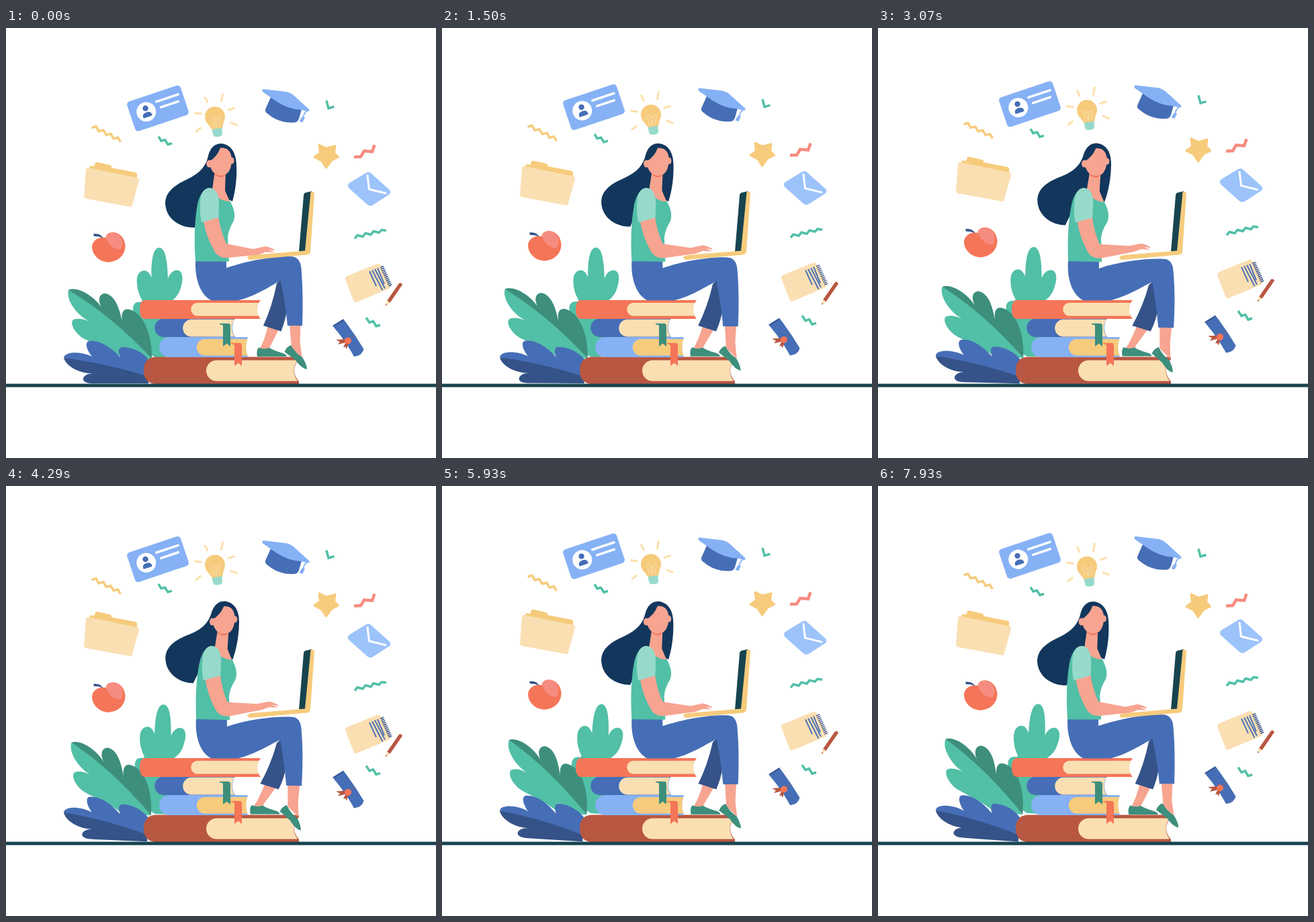
These frames come from a looping animation (640 by 640 pixels, 8 s). An HTML page:

```html
<!DOCTYPE html>
<html lang="en">
<head>
<meta charset="utf-8">
<title>Learning online</title>
<style>
  html, body { margin: 0; width: 100%; height: 100%; overflow: hidden; background: #fff; }
  svg { display: block; width: 100vw; height: 100vh; }
  .line { fill: none; }
  .round { stroke-linecap: round; stroke-linejoin: round; }
  .navy { fill: #13375c; }
  .blue { fill: #466eb6; }
  .deep { fill: #355389; }
  .sky { fill: #86b1f5; }
  .green { fill: #52bfa7; }
  .fern { fill: #3d8f7c; }
  .skin { fill: #f7a491; }
  .coral { fill: #f57558; }
  .gold { fill: #f6cb7c; }
  .cream { fill: #fadfb3; }
  .brick { fill: #b85742; }
  .teal { fill: #17444f; }
</style>
</head>
<body>
<svg viewBox="0 0 640 640">
  <!-- floating things: data-rise is the time to the top, in ms -->
  <g data-rise="7100">
    <g transform="translate(226 119.5) rotate(-18.5)">
      <rect class="sky" x="-42" y="-23.2" width="84" height="46.400" rx="5"/>
      <circle cx="-18" cy="-.5" r="14.500" fill="#fff"/>
      <circle class="blue" cx="-17.500" cy="-5.800" r="4.200"/>
      <path class="blue" d="M-25 6.500C-25 1-21 .2-18 .2S-11 1-11 6.500Q-11 7.500-13 7.500H-23Q-25 7.500-25 6.500Z"/>
      <path class="line round" stroke="#fff" stroke-width="3.500" d="M1-10H35M5 0H32"/>
    </g>
  </g>
  <g data-rise="6100">
    <path class="gold" d="M124 210L125 205L131 206L133 201Q134 199 137 200L155 204Q158 205 157 208L193 215Q196 216 195 221L194 230L124 215Z"/>
    <path class="cream" d="M123 208L196 223Q199 224 198 227L188 263Q187 267 184 266L119 254Q116 253 116 250L119 211Q120 207 123 208Z"/>
  </g>
  <g data-rise="6500">
    <path class="coral" d="M149 312C135 310 128 318 128 326C129 340 141 349 154 348.500C168 347 178 337 177.500 323C176 310 167 304 159 304C153 304 148 308 149 312Z"/>
    <path fill="#f68c7f" d="M149 311C150 305 160 303 166 306C174 311 176 322 171 329C163 332 150 321 149 311Z"/>
    <path class="deep" d="M130 306.500Q141 305 144.500 313Q139 309.500 131 310Z"/>
  </g>
  <g data-rise="5300">
    <circle class="gold" cx="311" cy="132" r="15"/>
    <path class="gold" d="M299 141L307 151.500L322 149.500L324 139Z"/>
    <path fill="#97dacb" d="M306.500 151L321.500 148.500L322 158Q321 161 318 161.500L313 162Q309 162 308 158Z"/>
    <path class="line" stroke="#fadfb3" d="M309.500 149L306 137A2.600 2.600 0 1 1 309.500 134L312 136L315 134A2.600 2.600 0 1 1 318 137L318 147M309.500 134L313 148L315 134"/>
    <path class="line round" stroke="#fbe0ac" stroke-width="3" d="M296.500 103.500L300 110.500M322.500 98.500L320.500 109M331 122L339.500 119.500M335 141L343.500 144.500M283 154L289.500 149M281.500 126.500L290.500 127.500"/>
  </g>
  <g data-rise="7500">
    <path class="blue" d="M394 103L386 121Q385 125 390 128C400 137 415 142 430 140.500Q434 140 436 135L440 121L410 108Z"/>
    <path class="sky" d="M384 91L418 95Q425 97 429 101L451 121Q453 124.500 449 124L440 122Q420 121 402 109L382 95Q380 91 384 91Z"/>
    <path class="line" stroke="#86b1f5" stroke-width="1.800" d="M448.500 123Q443.500 126 442.500 133"/>
    <path class="sky" d="M440.500 132L445 133L441.500 140.500L436.500 139Z"/>
  </g>
  <path data-rise="5500" fill="#f6cb7c" stroke="#f6cb7c" stroke-width="3" stroke-linejoin="round" d="M466 174L477 179L490 175.500L488.500 186L494.500 192L484.500 197L476.500 208L470 198L459 192L467.500 186Z"/>
  <g data-rise="7800">
    <path fill="#9cc3fa" d="M512 230L536 215.500Q540 213.500 543 216L571 241Q574 245 570 248L546 263.500Q542 266 538 263L510 238Q507 233 512 230Z"/>
    <path class="line round" stroke="#fff" stroke-width="3" d="M538 219.500L540.500 240L565 246"/>
  </g>
  <g data-rise="7300">
    <path class="cream" d="M508 369L552 351Q556 350 558 354L572 382Q573 386 570 388L522 408Q518 409 517 405L505 374Q505 370 508 369Z"/>
    <path id="notes" class="line" stroke="#466eb6" stroke-width="1.900"/>
    <path id="coil" class="line" stroke="#355389" stroke-width="1.500"/>
  </g>
  <g data-rise="7300">
    <path class="brick" d="M585 380Q588 378.500 590 382L571.500 409L567 406Z"/>
    <path class="cream" d="M567 405.500L571.800 408.800L565 413.500Z"/>
    <path class="brick" d="M565.500 410.500L567.500 412L565 413.500Z"/>
  </g>
  <g data-rise="7700">
    <path class="blue" d="M486 443L502 433Q519 455 532.500 478Q530 488 518 489Q505 465 486 443Z"/>
    <path class="line" stroke="#355389" stroke-width="1.500" d="M487.500 443.500L502 434.500"/>
    <path class="brick" d="M491 464L505 463L506 468L494 471L497 467ZM506 467L502 475L505 474.500L507 478L509.500 469Z"/>
    <path class="line" stroke="#b85742" d="M513 462L518 457.500"/>
    <circle class="coral" cx="509" cy="465.500" r="5"/>
  </g>
  <g class="line" stroke="#52bfa7" stroke-width="3.500">
    <path data-rise="8000" stroke="#f6cb7c" d="M127.500 148.500L134 146.500L138 153.500L145 152L149 159L156 157.500L160 164.500L166.500 163L170.500 169.500"/>
    <path data-rise="4800" d="M227 161.500L231 168L236.500 166.500L241 173.500L247 171.500"/>
    <path data-rise="6300" d="M477 108L480 119.500L488.500 117"/>
    <path data-rise="5800" stroke="#f68c7f" stroke-width="4.500" d="M518 192L528 191.500L533 183L545 184L548.500 174"/>
    <path data-rise="8100" d="M519 313.500L523 308.500L531 310.500L535 305.500L543 307.500L547 302.500L555 304.500L559 300.500L566 301.500"/>
    <path data-rise="5300" d="M536 431L541 438.500L546.500 436.500L551 444L557 442"/>
  </g>

  <g id="bush">
    <path class="green" d="M222 490C200 480 190 440 189 418C189 410 194 407 201 408L203 406C196 394 194 382 195 372C197 361 206 358.500 211 363C214 366 215 368 216.500 371C216 350 218 327 228 327C238 327 240.500 350 241 373C244 364 251 359 257 361C264 364 263.500 375 260.500 385C258 396 252 402 247 406L237 490Z"/>
  </g>
  <g id="fern">
    <path class="green" d="M93 390C90 400 97 414 108 425C115 432 122 436 129 439C116 432 104 431 99 435C96 441 101 451 112 460C126 469 150 474 175 492L217 492L150 420Z"/>
    <path class="fern" d="M93 390C105 384 132 398 145 420C136 408 137 396 147 395C162 397 169 417 173 437C171 424 174 418.500 181 418.500C203 421 218 455 217 492Q157 428 93 390Z"/>
  </g>
  <g id="frond">
    <path class="deep" d="M86 491C90 505 112 515 130 514C120 514 114 519 115 524C118 529 125 529 135 529H212V510L150 496Z"/>
    <path class="blue" d="M86 491C87 481 112 481 128 489C119 478 117 467 124 466C141 464 159 478 170 490C166 479 168 475 174 475C191 475 205 485 212 493V519Q150 499 86 491Z"/>
  </g>

  <!-- books -->
  <path class="brick" d="M222 489.500H436V493Q422 510 436 526V530H222Q205 528 205 510Q205 491 222 489.500Z"/>
  <path class="cream" d="M313.500 494.500H434Q423 510 434 525.500H313.500A15.500 15.500 0 0 1 313.500 494.500Z"/>
  <path class="sky" d="M243 460H360Q354 475 360 490H243A15 15 0 0 1 243 460Z"/>
  <path class="gold" d="M296 463H359.500Q355 475 359.500 487.500H296A12.250 12.250 0 0 1 296 463Z"/>
  <path class="blue" d="M235 432.500H341Q332 446 341 460H235A13.750 13.750 0 0 1 235 432.500Z"/>
  <path class="cream" d="M275 433.800H340Q332 446 340 459.500H275A12.900 12.900 0 0 1 275 433.800Z"/>
  <path class="coral" d="M206 405H379Q368 419 379 433H206Q199 432 199 419T206 405Z"/>
  <path class="cream" d="M285 409H376.500Q370.500 419 376.500 428.500H285A9.750 9.750 0 0 1 285 409Z"/>
  <path class="fern" d="M318 439.800H331Q334 440 334 444V474L328.500 469.500L323 474V443Q322 441.200 318 441.200Z"/>
  <path class="coral" d="M335 468.800H348Q351 469 351 473V503L345.700 498.500L340 503V473Q340 470.200 335 470.200Z"/>
  <rect class="teal" y="529.500" width="640" height="5"/>

  <!-- reader -->
  <path id="calf" class="skin"/>
  <path id="backShoe" class="fern" d="M376 475.500Q372 480 374 489L417.500 489Q418 486 412 484Q398 480 392 476Q385 479 376 475.500Z"/>
  <path id="shin" class="skin"/>
  <path id="frontShoe" class="fern" d="M424 472Q418 474 414.500 482L431 494.500Q440 507 448 508Q447.500 500 441 490Q431 484 424 472Z"/>
  <path id="backLeg" class="deep"/>
  <path id="frontLeg" class="blue"/>
  <path class="teal" d="M443 249Q443 246 446 245L455 243L447 332.500L436 333Z"/>
  <path class="gold" d="M453.500 244Q459 242 459 247L453 333Q452 337 448 337.500L364 345Q360 345 359 341Q362 338.500 367 338L445 331.500Z"/>
  <path id="hair" class="navy" d="M320 172C335 173 343 186 343 205C344 225 341 245 337 258Q330 256 326 250L310 250Q292 255 288 280L281 297C260 298 238 285 237 261C237 242 255 232 270 225C289 216 298 205 301 190C304 178 311 172 320 172Z"/>
  <g id="torso">
    <path class="green" d="M307 240Q312 256 333 257C339 268 342 277 339 287Q331 300 330 312L332 347.500L282 347.500C280 320 280 290 285 262Q290 240 303 238Z"/>
    <path class="skin" d="M311 212L307 240Q315 258 333 258L326 242L327 212Z"/>
    <path class="coral" d="M310 213L310 217Q319 226 326.500 219L328 213Z"/>
    <ellipse class="skin" cx="302.500" cy="202" rx="4.200" ry="5.500"/>
    <ellipse class="skin" cx="336.500" cy="197.500" rx="3" ry="5"/>
    <path class="skin" d="M319 178.500C331 177 336 186 336 197C335 212 330 220 319 219.500C311 219 306 213 304 206L303 198Q314 192 319 178.500Z"/>
    <path id="arm" class="skin"/>
    <path fill="#97dacb" d="M289 262C289 244 296 238 303 238C313 239 317 248 317 262L316.500 282L291 289.500Q288 275 289 262Z"/>
  </g>
</svg>
<script>
  const LOOP = 8000, HEIGHT = 16, FALL = 8300, SWAY = 7500, LEAN = 3650;
  const el = id => document.getElementById(id);
  const set = (id, name, value) => el(id).setAttribute(name, value);
  const draw = (id, d) => set(id, 'd', d);
  const turn = (id, angle, x, y) => set(id, 'transform', `rotate(${angle} ${x} ${y})`);
  const wave = (t, half) => (1 - Math.cos(Math.PI * t / half)) / 2;
  const floats = [...document.querySelectorAll('[data-rise]')];

  const repeat = (n, f) => Array.from({ length: n }, (_, i) => f(i)).join('');
  draw('notes', repeat(4, i => `M${541 + i * 4} ${362 - i * 1.6}l${[10, 15.5, 15, 10][i]} ${[22, 30, 29, 24][i]}`));
  draw('coil', repeat(12, i => `M${557 + i * 1.12} ${356.5 + i * 2.5}l5 -2`));

  // quick rise, slower fall
  const lift = (t, rise) => HEIGHT * (t < rise ? wave(t, rise) : 1 - wave(t - rise, FALL));

  function reader(p) {
    turn('torso', 1.5 * p, 300, 395);
    turn('hair', 4.2 * p, 330, 262);

    const hx = 4 * p, hy = -7 * p;
    draw('arm', `M294 288L316 281Q320 305 328 321L${368 + hx} ${329 + hy}L${386 + hx} ${325 + hy}
      Q${397 + hx} ${327 + hy} ${401 + hx} ${331.5 + hy}L${390 + hx} ${330 + hy}L${400 + hx} ${334 + hy}
      L${386 + hx} ${333.5 + hy}L${376 + hx} ${337.5 + hy}L330 342Q315 343 309 330Q298 310 294 288Z`);

    draw('frontLeg', `M${282 + p} 347H${328 + p}V${357 + p}C${360 + p} ${346 + p} 400 ${339 + 4 * p} 425 ${340 + 4 * p}
      Q438 ${341 + 3 * p} 439.500 ${358 + 3 * p}C442 390 442 415 ${441 - p} ${443 + 3.5 * p}L${419 - 2 * p} ${443 + 3 * p}
      Q${416 - 2 * p} 410 ${409 - p} ${376 + 2 * p}C395 ${383 + p} 370 400 345 405.500H306C290 398 281 375 ${282 + p} 347Z`);
    draw('backLeg', `M409 ${374 + 3 * p}L403 ${380 + 3 * p}Q${396 - 2 * p} 415 ${383 - 5 * p} 443
      L${409.5 - 4 * p} 451.500Q${416 - 2 * p} 435 ${418 - 2 * p} 420Z`);
    draw('calf', `M${390 - 5 * p} 443L${406 - 5 * p} 449L${393 - 10 * p} ${474 - p}L${391 - 10 * p} 480
      L${377 - 10 * p} 478Q${384 - 9 * p} 468 ${390 - 5 * p} 443Z`);
    draw('shin', `M${422 - 3 * p} 441H${438.5 - p}L${437.5 - 3 * p} ${468 + p}L${441 - 6 * p} ${492 + p}
      L${425 - 6 * p} ${476 + p}Z`);
    set('backShoe', 'transform', `translate(${-11 * p} ${-.5 * p})`);
    set('frontShoe', 'transform', `translate(${-7.5 * p} ${3.5 * p}) rotate(${5 * p} 428 482)`);
  }

  function render(t) {
    for (const f of floats) f.setAttribute('transform', `translate(0 ${-lift(t, +f.dataset.rise)})`);
    const s = wave(t, SWAY);
    turn('bush', 4 * s, 270, 480);
    turn('fern', 5 * s, 250, 470);
    turn('frond', 4.1 * s, 205, 485);
    reader(wave(t, LEAN));
  }

  const start = performance.now();
  function tick() {
    render((performance.now() - start) % LOOP);
    requestAnimationFrame(tick);
  }
  tick();
</script>
</body>
</html>
```
